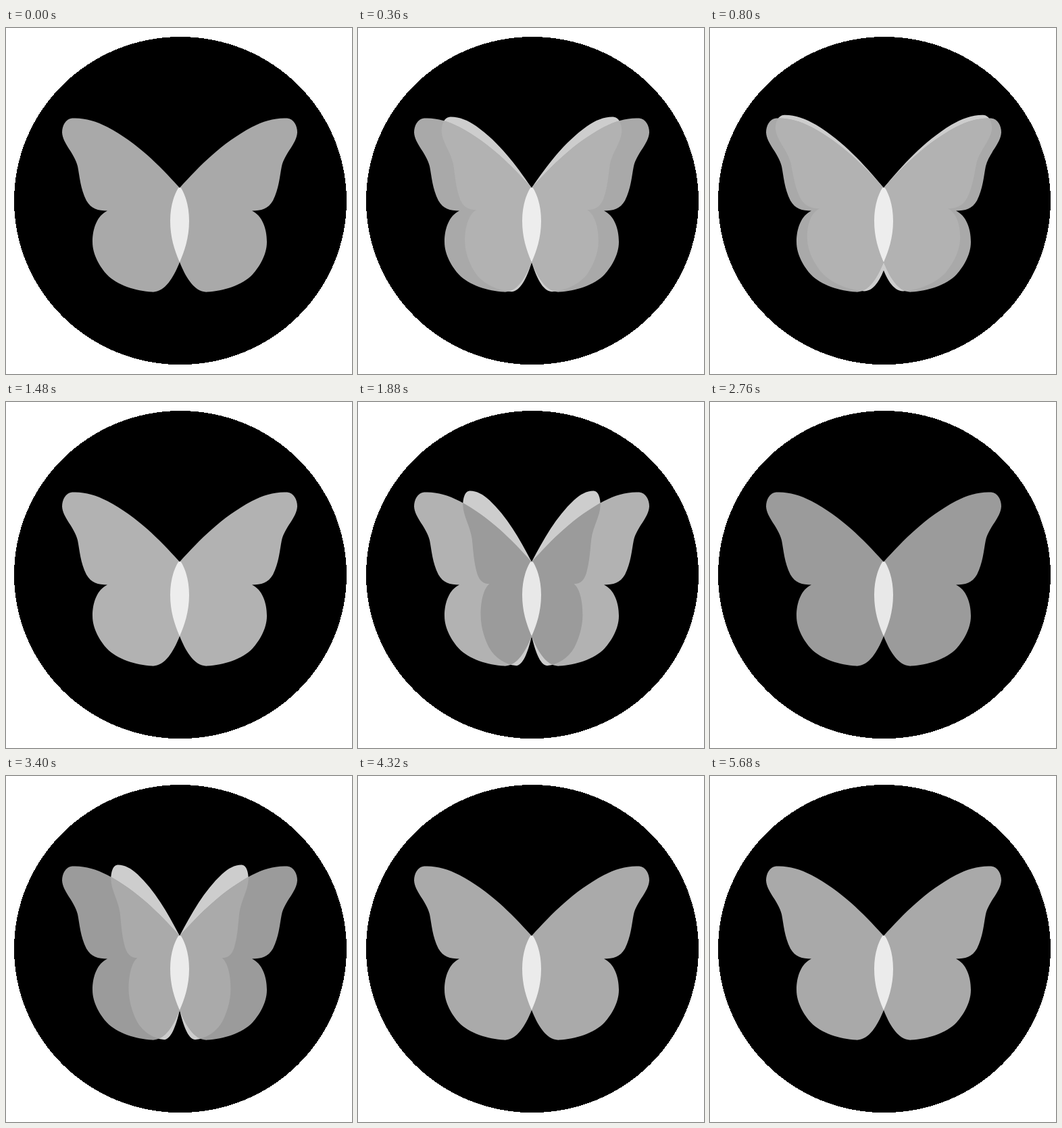
These frames come from a looping animation (512 px wide and 512 px high, 5800 ms). An HTML page:

```html
<!DOCTYPE html>
<html lang="en">
<head>
<meta charset="utf-8">
<title>Butterfly</title>
<style>
  html, body { margin: 0; width: 100%; height: 100%; overflow: hidden; background: #fff; }
  svg { display: block; width: 100vw; height: 100vh; }
</style>
</head>
<body>
<svg viewBox="0 0 512 512">
  <defs>
    <!-- Left wing, with the body axis at x = 0 -->
    <path id="wing" d="M0 236C-30 203-62 170-107 146C-124 137-142 132-159 133
      C-169 134-174 144-174 154C-173 171-156 184-151 204C-148 219-147 237-138 255
      C-131 267-121 270-107 270C-122 277-129 296-129 316C-129 336-117 354-108 364
      C-93 380-64 389-41 390C-21 391-8 366 0 346C7 330 14 310 14 285
      C14 264 9 248 2.5 237C1.5 235.5.5 235.5 0 236Z"/>
    <g id="pair">
      <use href="#wing"/>
      <use href="#wing" transform="scale(-1 1)"/>
    </g>
    <clipPath id="leftClip"><use href="#wing"/></clipPath>
    <clipPath id="pairClip">
      <use href="#wing"/>
      <use href="#wing" transform="scale(-1 1)"/>
    </clipPath>
    <g id="flap">
      <use class="moving" href="#wing"/>
      <use class="moving" href="#wing"/>
    </g>
  </defs>
  <ellipse cx="258" cy="255.6" rx="246" ry="242.6" shape-rendering="crispEdges"/>
  <g transform="translate(257 .6)">
    <use id="outside" href="#flap" fill="#cdcdcd"/>
    <use id="rest" href="#pair"/>
    <g clip-path="url(#pairClip)"><use id="inside" href="#flap"/></g>
    <g clip-path="url(#leftClip)"><use id="lens" href="#wing" transform="scale(-1 1)"/></g>
  </g>
</svg>
<script>
  const LOOP = 5800, CLOSE = 480, MAX_ANGLE = 68.3 * Math.PI / 180, NECK = 236;
  // Each flap leaves the wings in a new shade.
  const flaps = [
    { start: 80, end: 1200, from: 169, to: 178 },
    { start: 1500, end: 2640, from: 178, to: 155 },
    { start: 3020, end: 4160, from: 155, to: 170 },
    { start: 4560, end: 4560, from: 170, to: 169 }
  ];
  const get = id => document.getElementById(id);
  const [outside, rest, inside, lens] = ['outside', 'rest', 'inside', 'lens'].map(get);
  const wings = document.querySelectorAll('.moving');
  const gray = v => `rgb(${v},${v},${v})`;

  // Wings close at a steady turn, then spread with a soft, slightly tilted landing.
  function pose(t, length) {
    if (t < CLOSE) {
      const u = t / CLOSE;
      return { angle: MAX_ANGLE * u, lift: 0.012 * Math.min(1, 3 * u), lean: 0 };
    }
    const u = (t - CLOSE) / (length - CLOSE);
    const tilt = u * (1 - u);
    return {
      angle: MAX_ANGLE * Math.pow(1 - u, 2.07),
      lift: 0.012 * (1 - u) + 0.1 * tilt,
      lean: 0.17 * tilt
    };
  }

  function draw(now) {
    const time = now % LOOP;
    const flap = flaps.filter(f => time >= f.start).pop();
    const moving = !!flap && time < flap.end;
    const shade = flap ? flap.to : 169;

    rest.setAttribute('fill', gray(moving ? flap.from : shade));
    lens.setAttribute('fill', gray(Math.round(201 + 0.2 * shade)));
    for (const layer of [outside, inside]) layer.setAttribute('display', moving ? 'inline' : 'none');

    if (moving) {
      const { angle, lift, lean } = pose(time - flap.start, flap.end - flap.start);
      const sx = Math.cos(angle);
      inside.setAttribute('fill', gray(shade));
      wings.forEach((wing, i) => {
        const side = i ? -1 : 1;
        wing.setAttribute('transform',
          `matrix(${side * sx} ${lift} ${side * lean} 1 ${-side * lean * NECK} 0)`);
      });
    }
    requestAnimationFrame(tick);
  }

  const began = performance.now();
  function tick() { draw(performance.now() - began); }
  tick();
</script>
</body>
</html>
```
